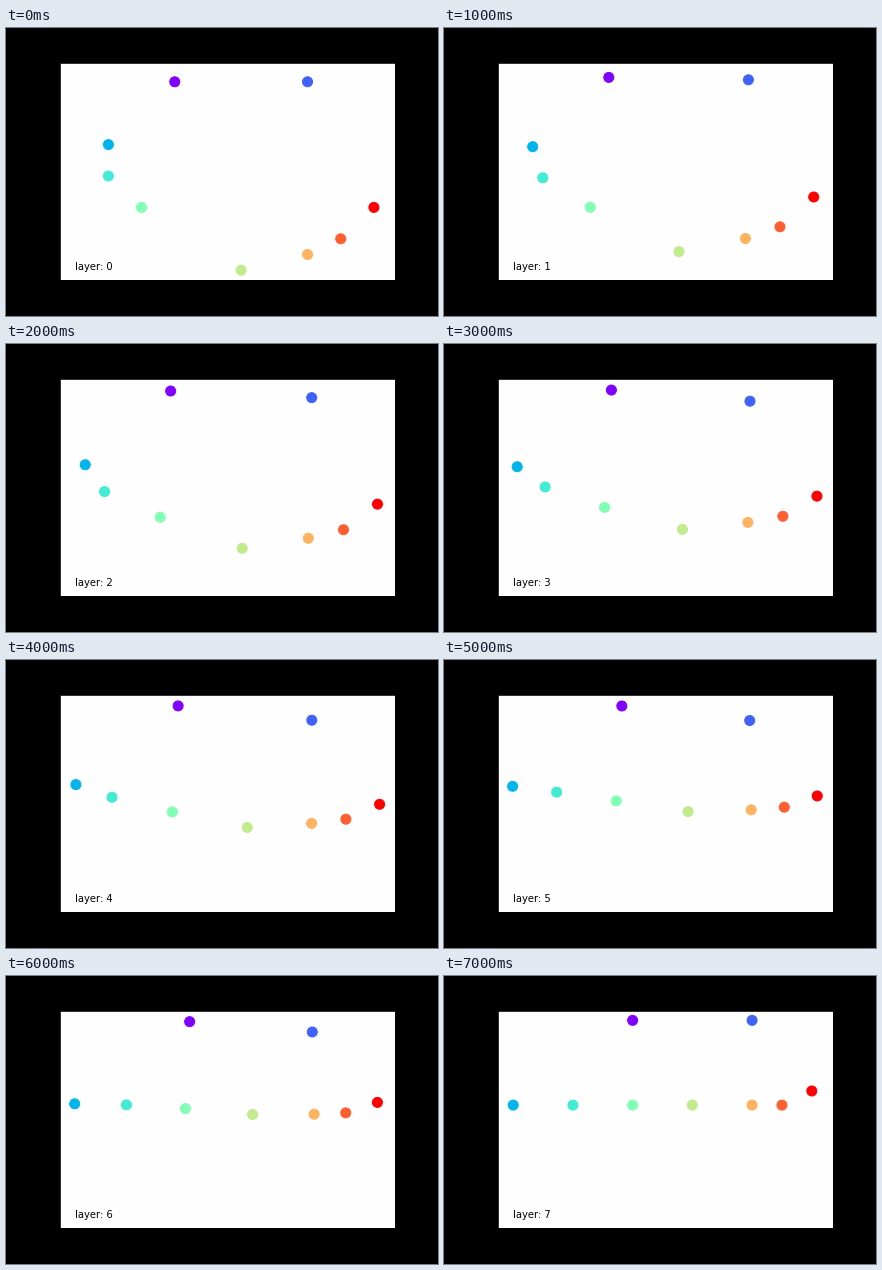
Recreate the animation shown at these times as a matplotlib script. Size 432 by 288 pixels, loop 8000 ms.

```python
import matplotlib.pyplot as plt
import numpy as np
from matplotlib.animation import FuncAnimation

W, H, DPI = 432, 288, 72
LAYERS = 8


def grid(cols, rows, step, origin):
    """Lattice points in pixels from the top left, rows counted upwards."""
    cells = np.column_stack([cols, rows]) * np.array([1, -1])
    return np.array(origin) + cells * np.array(step)


# Every dot travels from one lattice to another by way of two bends.
start = grid([3, 7, 1, 1, 2, 5, 7, 8, 9], [12, 12, 8, 6, 4, 0, 1, 2, 4],
             (33.19, 15.7), (69.2, 242.2))
bend_1 = [(164.8, 49.4), (304.4, 51.8), (88.7, 118.7),
          (98.8, 149.8), (146.2, 179.3), (235.0, 223.6),
          (301.4, 210.5), (336.0, 198.8), (369.7, 169.0)]
bend_2 = [(172.1, 45.9), (305.8, 60.2), (69.9, 124.6),
          (106.0, 137.3), (166.3, 151.9), (241.2, 167.5),
          (305.6, 163.4), (339.9, 159.2), (373.6, 144.3)]
end = grid([4, 8, 0, 2, 4, 6, 8, 9, 10], [6, 6, 0, 0, 0, 0, 0, 0, 1],
           (29.86, 14.12), (69.2, 129.1))

# One cubic per coordinate through the four poses.
poses = np.array([start, bend_1, bend_2, end])
cubics = np.polyfit([0, 1, 4, LAYERS - 1], poses.reshape(4, -1), 3)


def positions(layer):
    return (layer ** np.arange(3, -1, -1) @ cubics).reshape(-1, 2)


fig = plt.figure(figsize=(W / DPI, H / DPI), dpi=DPI, facecolor="black")
ax = fig.add_axes([0.125, 0.125, 0.775, 0.755], facecolor="#fefefe")
ax.set_xlim(0.125 * W, 0.9 * W)
ax.set_ylim(0.875 * H, 0.12 * H)
ax.set_xticks([])
ax.set_yticks([])

colors = plt.cm.rainbow(np.linspace(0, 1, len(start)))
dots = ax.scatter(*start.T, s=100, c=colors, linewidths=1)
label = ax.text(69.2, 242.2, "", fontsize=10, family="DejaVu Sans")


def draw(layer):
    dots.set_offsets(positions(layer))
    label.set_text(f"layer: {layer}")
    return dots, label


anim = FuncAnimation(fig, draw, frames=LAYERS, interval=1000, repeat=True)
plt.show()
```
